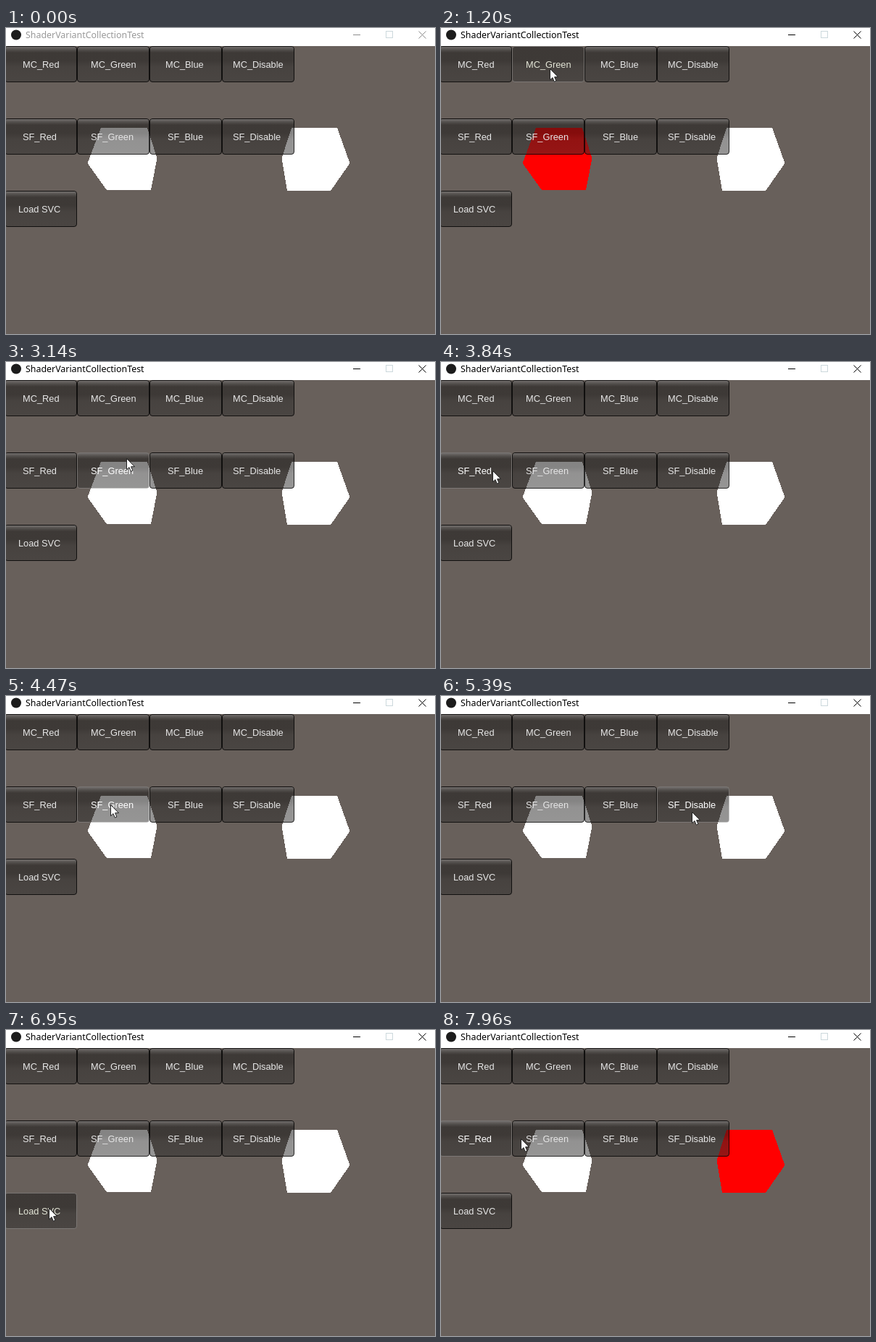
Animation, 592 px wide and 423 px high, one loop 8 s. Source, as an HTML page:

```html
<!DOCTYPE html>
<html lang="en">
<head>
<meta charset="utf-8">
<title>ShaderVariantCollectionTest</title>
<style>
  html, body { margin: 0; width: 100%; height: 100%; overflow: hidden; background: #68605b; }
  svg { display: block; width: 592px; height: 423px; }
  .title { font: 12.4px "Noto Sans", "Open Sans", sans-serif; fill: #999; }
  .control { stroke: #8c8c8c; fill: none; }
  .active .title { fill: #000; }
  .active .control { stroke: #000; }
  .control.off, .active .control.off { stroke: #ccd8dc; }
  .body { fill: url(#body); stroke: rgba(0, 0, 0, .8); }
  .gloss { fill: url(#gloss); }
  .button text { font: 12.8px "Liberation Sans", Arial, sans-serif; fill: #e6e6e6; }
  .hover .body, .press .body { stroke: rgba(190, 190, 190, .35); }
  .hover text { fill: #fff; }
  .press text { fill: #e3e5d6; }
  .press .gloss { display: none; }
</style>
</head>
<body>
<svg id="stage" viewBox="0 0 592 423">
  <defs>
    <linearGradient id="body" x2="0" y2="1">
      <stop offset=".4" stop-color="#181716" stop-opacity=".53"/>
      <stop offset=".58" stop-color="#262524" stop-opacity=".5"/>
      <stop offset="1" stop-color="#2c2b2a" stop-opacity=".5"/>
    </linearGradient>
    <linearGradient id="gloss" x2="0" y2="1">
      <stop offset="0" stop-color="#fff" stop-opacity=".27"/>
      <stop offset=".5" stop-color="#fff" stop-opacity=".11"/>
      <stop offset="1" stop-color="#fff" stop-opacity="0"/>
    </linearGradient>
  </defs>
  <rect width="592" height="423" fill="#68605b"/>
  <rect width="592" height="25" fill="#fff"/>
  <circle cx="14" cy="9.5" r="7" fill="#1c1c1c"/>
  <text class="title" x="27" y="14">ShaderVariantCollectionTest</text>
  <path class="control" d="M479 9.5H489"/>
  <rect class="control off" x="524.5" y="4.5" width="9" height="9"/>
  <path class="control" d="M569.5 4.5l10 10m0-10l-10 10"/>
  <g shape-rendering="crispEdges">
    <polygon id="left" points="131,138 195,138 208.5,180 200,224 139,224 112.5,187"/>
    <polygon id="right" points="394,138 457,138 474.5,187 448,225 388,225 380.5,180"/>
  </g>
  <g id="buttons"></g>
  <path id="cursor" d="M.5 .5V15.8L4 12.6L6.3 18.2L8.9 17.1L6.6 11.7H11.5Z" fill="#fff" stroke="#222"/>
</svg>
<script>
const LOOP = 8000, STEP = 76.67, LAG = 40;
const $ = id => document.getElementById(id);

function svg(tag, attrs, parent) {
  const el = document.createElementNS("http://www.w3.org/2000/svg", tag);
  for (const key in attrs) el.setAttribute(key, attrs[key]);
  return parent.appendChild(el);
}

// Rows of buttons: label and left edge of its text
const rows = [
  { MC_Red: 23, MC_Green: 117, MC_Blue: 220, MC_Disable: 313 },
  { SF_Red: 23, SF_Green: 117, SF_Blue: 223, SF_Disable: 313 },
  { "Load SVC": 17 }
];
const buttons = rows.flatMap((row, r) => Object.entries(row).map(([label, textX], c) => {
  const x = c * 100 - 2, y = 25 + r * 100;
  const el = svg("g", { class: "button" }, $("buttons"));
  svg("rect", { class: "body", x: x + .5, y: y + .5, width: 99, height: 49, rx: 3.5 }, el);
  svg("rect", { class: "gloss", x: x + 1, y: y + 1, width: 98, height: 8, rx: 2.5 }, el);
  svg("text", { x: textX, y: y + 30 }, el).textContent = label;
  return { label, x, y, el };
}));
const buttonAt = ([x, y]) =>
  buttons.find(b => x >= b.x && x < b.x + 100 && y >= b.y && y < b.y + 50);

// Pointer moves: arrival, duration, x, y
const moves = [
  [140, 0, 168, 236], [665, 525, 60, 56], [968, 80, 150, 56], [1820, 460, 246, 55],
  [2370, 325, 345, 50], [3060, 220, 191, 129], [3450, 390, 64, 150], [3920, 230, 85, 149],
  [4390, 300, 144, 150], [4850, 230, 240, 159], [5390, 385, 346, 160], [6480, 700, 64, 244],
  [6630, 70, 59, 246], [7420, 390, 58, 150], [7958, 153, 110, 150]
];
const clicks = [730, 1200, 1970, 2600, 3460, 4540, 4930, 5700, 6945, 7740];
const colors = { Red: "#f00", Green: "#0f0", Blue: "#00f", Disable: "#fff" };

// Position at the latest screen update
function pointer(t) {
  let [, , x, y] = moves[0];
  for (const [arrive, length, toX, toY] of moves) {
    const since = t - (arrive - length);
    if (since < 0) break;
    const p = since >= length ? 1 : Math.floor(since / STEP) * STEP / length;
    x += (toX - x) * p;
    y += (toY - y) * p;
  }
  return [x, y];
}

// The SF buttons only work once the collection is loaded
function replay(t) {
  const scene = { left: "#fff", right: "#fff", loaded: false, pressed: null };
  for (const down of clicks) {
    if (t < down) break;
    const button = buttonAt(pointer(down));
    if (t < down + STEP) {
      scene.pressed = button;
      break;
    }
    const [group, name] = button.label.split("_");
    if (group === "MC") scene.left = colors[name];
    else if (group !== "SF") scene.loaded = true;
    else if (scene.loaded) scene.right = colors[name];
  }
  return scene;
}

function draw(t) {
  const active = t >= clicks[0];
  const scene = replay(t);
  const hovered = active ? buttonAt(pointer(t - LAG)) : null;
  const [x, y] = pointer(t).map(Math.round);

  $("stage").classList.toggle("active", active);
  $("cursor").setAttribute("transform", `translate(${x} ${y})`);
  $("cursor").setAttribute("visibility", t < moves[0][0] ? "hidden" : "visible");
  for (const id of ["left", "right"]) $(id).setAttribute("fill", scene[id]);
  for (const b of buttons) {
    const state = b === scene.pressed ? " press" : b === hovered ? " hover" : "";
    b.el.setAttribute("class", "button" + state);
  }
}

const begin = performance.now();
function tick() {
  draw((performance.now() - begin) % LOOP);
  requestAnimationFrame(tick);
}
tick();
</script>
</body>
</html>
```
